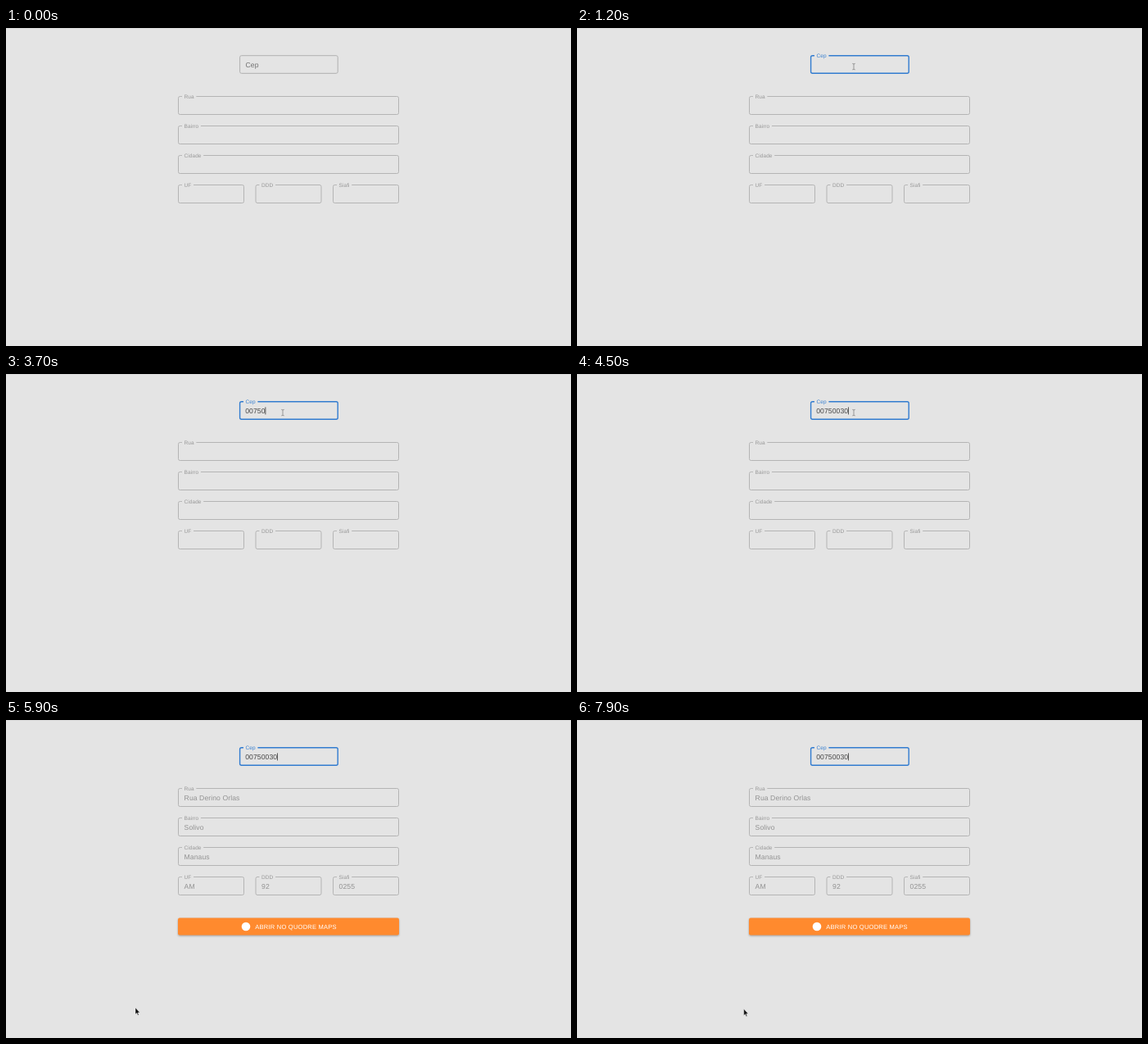
Animation of 690x388 px, one loop 8000 ms. Source, as an HTML page:

```html
<!DOCTYPE html>
<html lang="pt">
<head>
<meta charset="utf-8">
<title>Busca de Cep</title>
<style>
  html, body { margin: 0; width: 100%; height: 100%; overflow: hidden; background: #e4e4e4; }
  svg { display: block; width: 690px; height: 388px; }
  text { font-family: "Liberation Sans", Arial, sans-serif; letter-spacing: .00938em; text-rendering: geometricPrecision; }
  .box { fill: none; stroke: #b4b4b4; stroke-width: 1; }
  .label { font-size: 6.47px; fill: #979797; }
  .value { font-size: 8.625px; fill: #929292; }
  #typed { fill: #444; }
  .action { font-size: 7.55px; letter-spacing: .02857em; fill: #fff; }
  #button rect { filter: drop-shadow(0 1px 1px rgba(0, 0, 0, .3)); }
</style>
</head>
<body>
<svg viewBox="0 0 690 388">
  <rect width="690" height="1" fill="#d9d9d9"/>
  <g id="form"></g>
  <g id="button">
    <rect x="210" y="241.5" width="270" height="21" rx="2" fill="#ff8a2e"/>
    <circle cx="293" cy="252" r="5.3" fill="#fff"/>
    <text class="action" x="304.3" y="254.6">ABRIR NO QUODRE MAPS</text>
  </g>
  <path id="cepBox" class="box"/>
  <text id="cepLabel" class="label">Cep</text>
  <text id="typed" class="value" x="292.2" y="47.8"></text>
  <rect id="caret" y="40.4" width=".8" height="9" fill="#333"/>
  <path id="beam" d="M-1.7-3.6Q0-3.6 0-2.8Q0-3.6 1.7-3.6M0-3V3.2M-1.7 3.8Q0 3.8 0 3Q0 3.8 1.7 3.8" fill="none" stroke="#777" stroke-width=".7"/>
  <path id="arrow" d="M0 0V8L1.8 6.4L3 9.2L4.2 8.7L3 6H5.4Z" fill="#111" stroke="#fff" stroke-width=".4"/>
  <path id="resize" d="M-5 0L-2.6-2V-.5H2.6V-2L5 0L2.6 2V.5H-2.6V2Z" fill="#111" stroke="#fff" stroke-width=".3"/>
</svg>
<script>
const LOOP = 8000, STEP = 100;
const CEP = '00750030';
const DIGIT = 4.877;
const KEYS = [2700, 2900, 3200, 3400, 3700, 3900, 4200, 4500];
const BLINKS = [700, 1200, 1800, 2300, 2700, 5000, 5500, 6100, 6600, 7100, 7600];
const HOVER = 500, FOCUS = 700, RESULT = 5000;

// time, x, y of the pointer
const TRACK = [
  [5000, 338, 47], [5300, 300, 190], [5500, 248, 340], [5800, 158, 372],
  [6000, 158, 330], [6300, 132, 371], [6500, 95, 366], [6800, 0, 347],
  [7300, 0, 347], [7500, 25, 350], [7900, 203.7, 352.5]
];

// label, value, x, y, width
const FIELDS = [
  ['Rua', 'Rua Derino Orlas', 210.5, 83.5, 269],
  ['Bairro', 'Solivo', 210.5, 119.5, 269],
  ['Cidade', 'Manaus', 210.5, 155.5, 269],
  ['UF', 'AM', 210.5, 191.5, 80],
  ['DDD', '92', 305, 191.5, 80],
  ['Siafi', '0255', 399.5, 191.5, 80]
];

const $ = id => document.getElementById(id);
const form = $('form');
const show = (el, on) => el.setAttribute('visibility', on ? 'visible' : 'hidden');

function add(tag, attrs, text = '') {
  const el = document.createElementNS('http://www.w3.org/2000/svg', tag);
  for (const key in attrs) el.setAttribute(key, attrs[key]);
  el.textContent = text;
  return form.appendChild(el);
}

// Rounded outline with an opening of the given width in its top edge
function outline(x, y, w, h, gap) {
  const r = 2, start = x + 4.4 + (gap ? 0 : 4);
  return `M${start + gap} ${y}H${x + w - r}q${r} 0 ${r} ${r}v${h - 2 * r}q0 ${r} ${-r} ${r}` +
    `H${x + r}q${-r} 0 ${-r} ${-r}v${-(h - 2 * r)}q0 ${-r} ${r} ${-r}H${start}`;
}

const values = FIELDS.map(([label, value, x, y, w]) => {
  const name = add('text', { class: 'label', x: x + 7.1, y: y + 2.3 }, label);
  add('path', { class: 'box', d: outline(x, y, w, 22, name.getComputedTextLength() + 5.4) });
  return add('text', { class: 'value', x: x + 7.1, y: y + 14.4 }, value);
});

function drawCep(t) {
  const p = t < FOCUS ? 0 : 1 - (1 - Math.min(1, (t - 640) / 260)) ** 3;
  const focused = t >= FOCUS;
  const box = $('cepBox'), label = $('cepLabel');
  box.setAttribute('d', outline(285.6, 33.7, 119.6, 21.6, 17.4 * Math.min(1, p * 1.4)));
  box.style.stroke = focused ? '#327cd0' : t >= HOVER ? '#666' : '#b0b0b0';
  box.style.strokeWidth = focused ? 1.4 : 1;
  label.setAttribute('x', 292.5);
  label.setAttribute('y', 47.8 - 12 * p);
  label.style.fontSize = 8.625 - 2.155 * p + 'px';
  label.style.fill = focused ? '#3a80d0' : '#707070';

  const count = KEYS.filter(k => k <= t).length;
  $('typed').textContent = CEP.slice(0, count);
  $('caret').setAttribute('x', 292.1 + count * DIGIT);
  show($('caret'), BLINKS.filter(b => b <= t).length % 2);
}

function pointerAt(t) {
  const i = TRACK.findIndex(k => k[0] > t);
  if (i === 0) return TRACK[0].slice(1);
  if (i < 0) return TRACK[TRACK.length - 1].slice(1);
  const [t0, x0, y0] = TRACK[i - 1], [t1, x1, y1] = TRACK[i];
  const u = (t - t0) / (t1 - t0);
  return [x0 + (x1 - x0) * u, y0 + (y1 - y0) * u];
}

function drawPointer(t) {
  const [x, y] = pointerAt(t);
  const kind = y < 56 ? 'beam' : x < 4 ? 'resize' : 'arrow';
  for (const id of ['beam', 'arrow', 'resize']) {
    $(id).setAttribute('transform', `translate(${x} ${y})`);
    show($(id), t >= HOVER && id === kind);
  }
}

function frame(now) {
  const t = Math.floor(now % LOOP / STEP) * STEP;
  drawCep(t);
  drawPointer(t);
  [...values, $('button')].forEach(el => show(el, t >= RESULT));
  requestAnimationFrame(frame);
}
frame(0);
</script>
</body>
</html>
```
